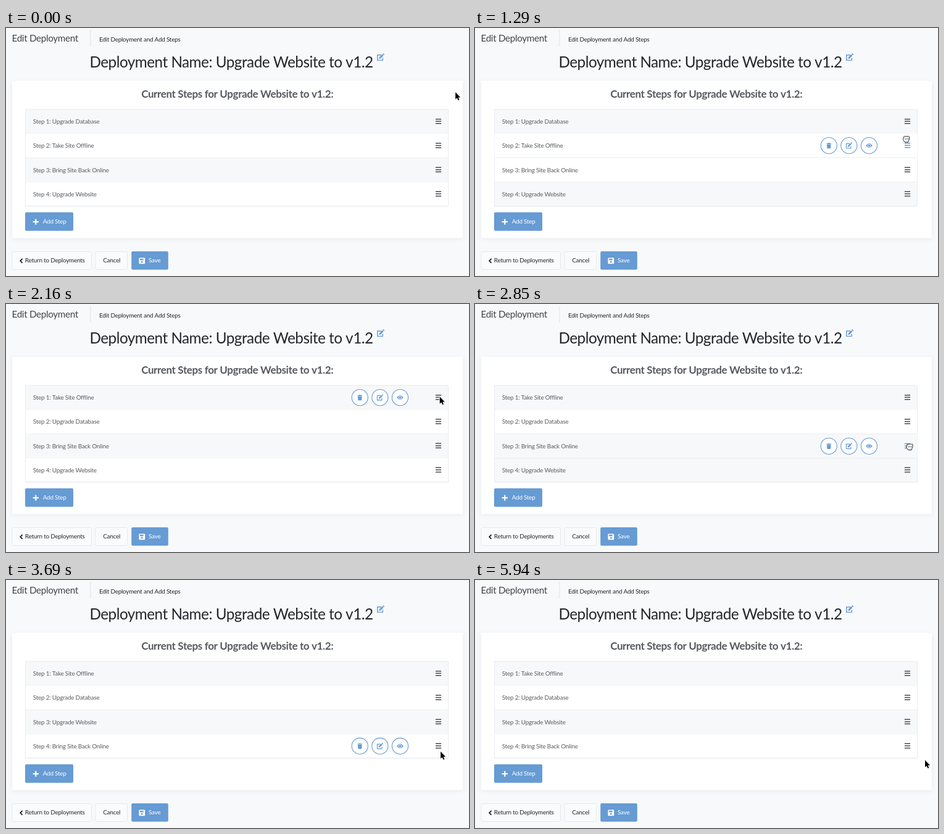
An HTML page with a canvas that plays this animation: 750x402 px, repeating every 6270 ms.

```html
<!DOCTYPE html>
<html lang="en">
<head>
<meta charset="utf-8">
<title>Edit Deployment</title>
<style>
html, body { margin: 0; width: 100%; height: 100%; overflow: hidden; background: #f8f9fb; }
canvas { display: block; width: 750px; height: 402px; }
</style>
</head>
<body>
<canvas id="stage"></canvas>
<script>
const W = 750, H = 402, LOOP = 6270, TICK = 30;
const BLUE = '#669bd4', PAGE = '#f8f9fb', STRIPE = '#f7f8fa', LINE = '#e9ebef';
const INK = '#23262b', GREY = '#595c61';
const LIST = { x: 31.5, y: 132, w: 685, row: 39.2 };
const DRAG_LAG = 50, GRAB_LEAD = 360;

const canvas = document.getElementById('stage');
const ctx = canvas.getContext('2d');
const dpr = window.devicePixelRatio || 1;
canvas.width = W * dpr;
canvas.height = H * dpr;

const smooth = k => k * k * (3 - 2 * k);
const easeIn = k => k * k;

// The pointer rests between moves; each move ends at (x, y).
const home = { x: 728, y: 104 };
const moves = [
  { start: 390, end: 810, x: 704, y: 188 },
  { start: 840, end: 990, x: 698, y: 185.2 },
  { start: 1230, end: 1500, x: 702.5, y: 141 },
  { start: 2100, end: 2400, x: 704, y: 229.5 },
  { start: 2760, end: 3330, x: 704.5, y: 295.5, ease: easeIn },
  { start: 3390, end: 3480, x: 704, y: 278 },
  { start: 4050, end: 4200, x: 729, y: 292 }
];
const drags = [
  { from: 1, to: 0, start: 1230, end: 1740 },
  { from: 2, to: 3, start: 2730, end: 3390 }
];

function pointerAt(t) {
  let { x, y } = home;
  for (const m of moves) {
    const k = Math.min(1, Math.max(0, (t - m.start) / (m.end - m.start)));
    const e = (m.ease || smooth)(k);
    x += (m.x - x) * e;
    y += (m.y - y) * e;
  }
  return { x, y };
}

function text(s, x, y, size, color, weight = 400, align = 'left') {
  ctx.font = `${weight} ${size}px Lato, "Open Sans", sans-serif`;
  ctx.letterSpacing = `${-0.02 * size}px`;
  ctx.textAlign = align;
  ctx.fillStyle = color;
  ctx.fillText(s, x, y);
}

function box(x, y, w, h, fill, stroke, r = 0) {
  ctx.beginPath();
  ctx.roundRect(x, y, w, h, r);
  if (fill) { ctx.fillStyle = fill; ctx.fill(); }
  if (stroke) { ctx.strokeStyle = stroke; ctx.lineWidth = 1; ctx.stroke(); }
}

function disc(x, y, r, fill, stroke, width = 1) {
  ctx.beginPath();
  ctx.arc(x, y, r, 0, 2 * Math.PI);
  if (fill) { ctx.fillStyle = fill; ctx.fill(); }
  if (stroke) { ctx.strokeStyle = stroke; ctx.lineWidth = width; ctx.stroke(); }
}

function poly(points, fill, stroke, width = 1) {
  ctx.beginPath();
  points.forEach(([x, y], i) => i ? ctx.lineTo(x, y) : ctx.moveTo(x, y));
  if (fill) { ctx.closePath(); ctx.fillStyle = fill; ctx.fill(); }
  if (stroke) { ctx.strokeStyle = stroke; ctx.lineWidth = width; ctx.stroke(); }
}

function at(x, y, scale, draw) {
  ctx.save();
  ctx.translate(x, y);
  ctx.scale(scale, scale);
  draw();
  ctx.restore();
}

function editIcon() {
  ctx.lineJoin = 'round';
  poly([[1, -3.3], [-4.6, -3.3], [-4.6, 4.6], [3.2, 4.6], [3.2, 1.2]], null, BLUE, 1.3);
  ctx.rotate(Math.PI / 4);
  box(-1.3, -4.6, 2.6, 6, BLUE);
  box(-1.3, -6.9, 2.6, 1.6, BLUE, null, 0.5);
  poly([[-1.3, 1.4], [1.3, 1.4], [0, 3.4]], BLUE);
}

function trashIcon() {
  box(-4, -4.1, 8, 1.3, BLUE, null, 0.4);
  box(-1.4, -4.9, 2.8, 1.2, BLUE, null, 0.4);
  poly([[-3.5, -2.2], [3.5, -2.2], [3, 4.8], [-3, 4.8]], BLUE);
}

function eyeIcon() {
  ctx.beginPath();
  ctx.moveTo(-5.6, 0);
  ctx.quadraticCurveTo(0, -7.6, 5.6, 0);
  ctx.quadraticCurveTo(0, 7.6, -5.6, 0);
  ctx.fillStyle = BLUE;
  ctx.fill();
  disc(0, 0, 2.4, null, '#fff');
}

function arrowCursor() {
  const shape = [[0, 0], [0, 11.6], [2.6, 9.2], [4.4, 13.2], [6.3, 12.4], [4.6, 8.5], [8.1, 8.5], [0, 0]];
  ctx.lineJoin = 'round';
  poly(shape, null, '#fff', 1.8);
  poly(shape, '#000');
}

function handCursor(closed) {
  const top = closed ? -3.8 : -5.2;
  ctx.lineJoin = 'round';
  ctx.beginPath();
  ctx.moveTo(-2.4, 5.4);
  ctx.lineTo(-4.8, 2);
  ctx.quadraticCurveTo(-6, -0.6, -4, -0.8);
  ctx.lineTo(-4.2, top + 1);
  for (let x = -4.2; x < 4; x += 2.3) ctx.quadraticCurveTo(x + 1.1, top - 2, x + 2.3, top + 0.5);
  ctx.quadraticCurveTo(5.6, 1, 3.6, 3.4);
  ctx.lineTo(3.2, 5.4);
  ctx.closePath();
  ctx.fillStyle = '#fff';
  ctx.fill();
  ctx.strokeStyle = '#222';
  ctx.lineWidth = 1;
  ctx.stroke();
  for (let x = -1.6; x < 3; x += 2.2) box(x - 0.4, -1.2, 0.8, 2.6, '#444');
}

function row(label, x, y, striped, active, blueHandle) {
  const mid = y + LIST.row / 2;
  box(x, y, LIST.w, LIST.row, striped ? STRIPE : '#fff');
  box(x, y + LIST.row - 0.5, LIST.w, 1, LINE);
  text(label, x + 12.3, mid + 3.6, 9.85, GREY);
  for (let i = -1; i <= 1; i++) {
    box(x + 664.3, mid - 1.1 + i * 3.6, 9.3, 1.5, blueHandle ? BLUE : '#484b4f', null, 0.3);
  }
  if (!active) return;
  [trashIcon, editIcon, eyeIcon].forEach((icon, i) => {
    const cx = x + 541.7 + i * 32.6;
    disc(cx, mid, 13.1, '#fff', BLUE, 1.1);
    at(cx, mid, 0.95, icon);
  });
}

function button(x, y, w, h, primary) {
  box(x, y, w, h, primary ? BLUE : '#fafbfc', primary ? null : '#e6e9ec', 2);
}

function drawPage() {
  ctx.fillStyle = PAGE;
  ctx.fillRect(0, 0, W, H);
  text('Edit Deployment', 9.5, 21.5, 15.2, '#42454a');
  box(136.5, 3, 1, 27, '#dfe2e6');
  text('Edit Deployment and Add Steps', 151, 21.8, 9.85, INK);
  text('Deployment Name: Upgrade Website to v1.2', 365, 64.3, 24.25, INK, 400, 'center');
  at(606.8, 47.3, 1.1, editIcon);

  ctx.save();
  ctx.shadowColor = 'rgba(60,70,100,0.09)';
  ctx.shadowBlur = 7 * dpr;
  ctx.shadowOffsetY = dpr;
  box(10, 85.5, 730, 255, '#fff');
  ctx.restore();
  text('Current Steps for Upgrade Website to v1.2:', 374.7, 112.6, 16.95, '#56595f', 700, 'center');

  button(31, 298.7, 78, 30, true);
  box(43.6, 313, 9.4, 2.2, '#fff', null, 0.5);
  box(47.2, 309.4, 2.2, 9.4, '#fff', null, 0.5);
  text('Add Step', 59.7, 317.4, 9.9, '#fff');

  button(10, 362.5, 128.5, 29, false);
  ctx.lineJoin = 'miter';
  poly([[26.6, 374], [23.2, 377.4], [26.6, 380.8]], null, INK, 1.8);
  text('Return to Deployments', 30.8, 380.4, 9.9, INK);
  button(145, 362.5, 51.5, 29, false);
  text('Cancel', 157.2, 380.4, 9.9, INK);
  button(203.2, 362, 59.6, 29.8, true);
  box(215.4, 372.4, 9.8, 9.8, '#fff', null, 1.2);
  box(217, 374, 5.6, 2.4, BLUE);
  disc(220.3, 379.2, 1.4, BLUE);
  text('Save', 231, 380.4, 9.9, '#fff');
}

function drawList(t, pointer, hand, drag) {
  const steps = ['Upgrade Database', 'Take Site Offline', 'Bring Site Back Online', 'Upgrade Website'];
  for (const d of drags) {
    if (t >= d.end) steps.splice(d.to, 0, steps.splice(d.from, 1)[0]);
  }
  const labels = steps.map((s, i) => `Step ${i + 1}: ${s}`);
  const slotY = i => LIST.y + i * LIST.row;
  const frame = () => box(LIST.x, LIST.y, LIST.w, LIST.row * 4, null, LINE);
  box(LIST.x, LIST.y, LIST.w, LIST.row * 4, '#fff');

  if (!drag) {
    const inside = pointer.x > LIST.x && pointer.x < LIST.x + LIST.w;
    const over = inside ? Math.floor((pointer.y - LIST.y) / LIST.row) : -1;
    labels.forEach((s, i) => row(s, LIST.x, slotY(i), i % 2 === 0, i === over, hand && i === over));
    frame();
    return;
  }

  // The row trails the pointer; the lifted row and its gap both count in the striping.
  const { from, to } = drag;
  const grab = pointerAt(drag.start), held = pointerAt(Math.max(drag.start, t - DRAG_LAG));
  const dx = held.x - grab.x, dy = held.y - grab.y;
  const gap = Math.abs(dy) > 34 ? to : from;
  labels.filter((s, i) => i !== from).forEach((s, i) => {
    const order = i + (i >= from) + (i >= gap);
    row(s, LIST.x, slotY(i + (i >= gap)), order % 2 === 0, false, false);
  });
  frame();
  row(labels[from], LIST.x + dx, slotY(from) + dy, (from + (gap < from)) % 2 === 0, true, true);
}

function render(now) {
  const t = Math.floor((now % LOOP) / TICK) * TICK;
  const pointer = pointerAt(t);
  const drag = drags.find(d => t >= d.start && t < d.end);
  const hand = drags.some(d => t >= d.start - GRAB_LEAD && t < d.end);
  ctx.setTransform(dpr, 0, 0, dpr, 0, 0);
  drawPage();
  drawList(t, pointer, hand, drag);
  at(pointer.x, pointer.y, 1, () => hand ? handCursor(drag) : arrowCursor());
}

const begin = performance.now();
function loop() {
  render(performance.now() - begin);
  requestAnimationFrame(loop);
}
loop();
</script>
</body>
</html>
```
